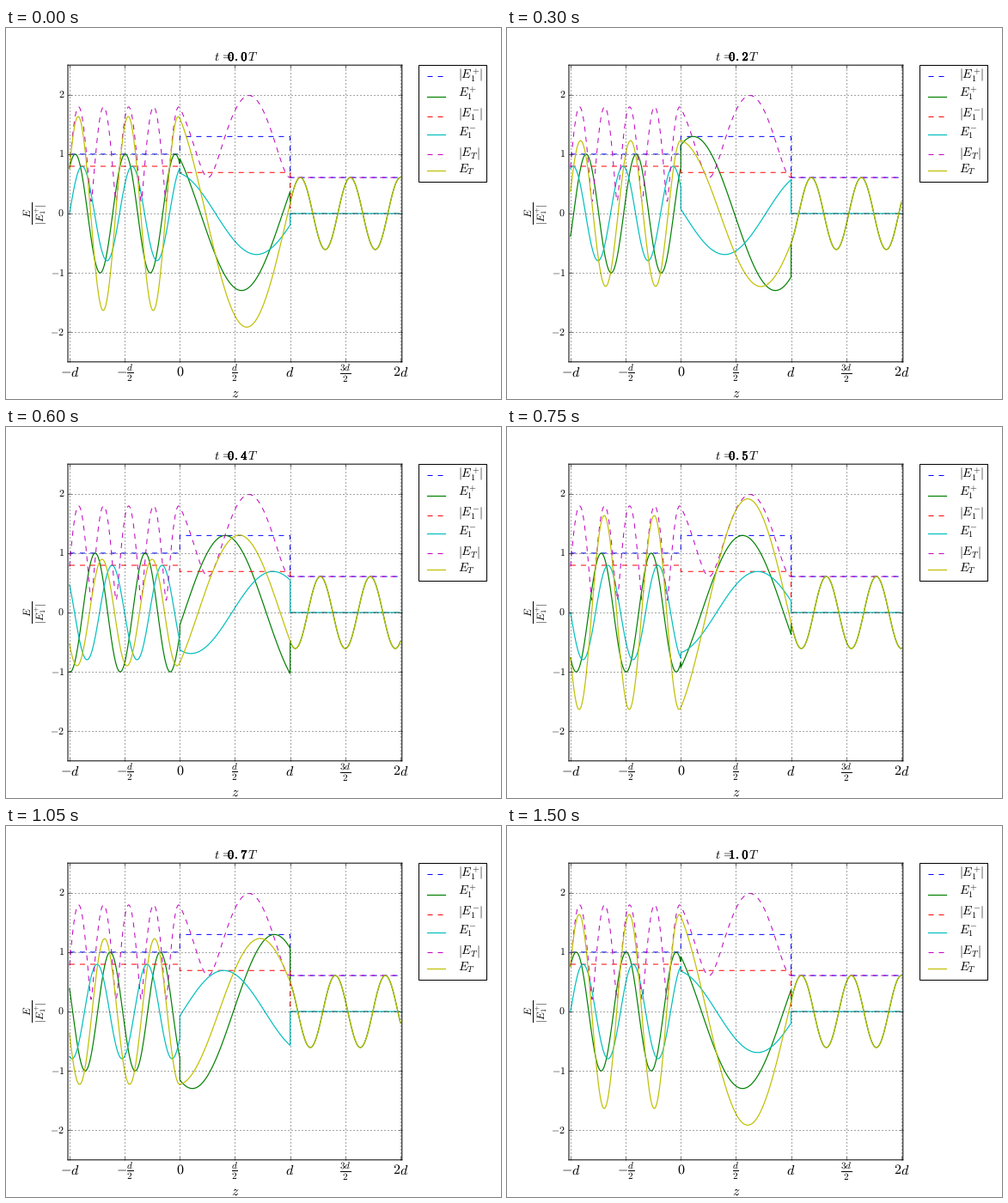
Recreate the animation shown at these times as a matplotlib script. Size 576 px wide and 432 px high, loop 1650 ms.

```python
import numpy as np
import matplotlib.pyplot as plt
from matplotlib.animation import FuncAnimation
from matplotlib.patches import Rectangle
from matplotlib.patheffects import withStroke

W, H, DPI = 576, 432, 72
FRAMES, INTERVAL = 11, 150
plt.rcParams.update({
    "mathtext.fontset": "cm",
    "text.hinting": "none",
    "lines.scale_dashes": False,
    "lines.solid_capstyle": "projecting",
    "lines.dash_capstyle": "butt",
    "axes.linewidth": 1.0,
    "path.simplify": False,
})

# Slab of thickness d = 1 between two identical, optically denser half-spaces.
RATIO = 3.28            # wave impedance of the slab relative to the outside
K1 = 13.85              # wave number outside
K2 = K1 / RATIO         # wave number inside
EXIT_PHASE = -1.284     # phase of the transmitted wave at z = d


def fields():
    """Positions and complex amplitudes of the forward and backward waves."""
    before, inside, after = (np.linspace(a, a + 1, 400) for a in (-1, 0, 1))
    c, s = np.cos(K2), np.sin(K2)
    incident = c - 0.5j * (RATIO + 1 / RATIO) * s
    reflected = -0.5j * (RATIO - 1 / RATIO) * s
    forward = np.concatenate([
        incident * np.exp(1j * K1 * before),
        (1 + RATIO) / 2 * np.exp(1j * K2 * (inside - 1)),
        np.exp(1j * K1 * (after - 1)),
    ])
    backward = np.concatenate([
        reflected * np.exp(-1j * K1 * before),
        (1 - RATIO) / 2 * np.exp(-1j * K2 * (inside - 1)),
        np.zeros_like(after),
    ])
    scale = np.exp(1j * EXIT_PHASE) / abs(incident)
    z = np.concatenate([before, inside, after])
    return z, forward * scale, backward * scale


fig = plt.figure(figsize=(W / DPI, H / DPI), dpi=DPI, facecolor="white")
ax = fig.add_axes([0.125, 0.1, 0.675, 0.8])
ax.set(xlim=(-1.015, 2.015), ylim=(-2.5, 2.5),
       xticks=np.arange(-1, 2.1, 0.5), yticks=range(-2, 3))
ax.tick_params(direction="in", top=True, right=True, length=4, width=0.5,
               labelbottom=False, labelleft=False)
ax.set_axisbelow(False)
ax.grid(color="black", linewidth=0.7, linestyle=(0, (1, 3)))
for spine in ax.spines.values():
    spine.set_snap(False)


def label(x, y, tex, size, ha="center", va="baseline", **kw):
    """Text at a pixel position counted from the top left corner."""
    return fig.text(x / W, 1 - y / H, f"${tex}$", fontsize=size,
                    ha=ha, va=va, **kw)


def pixel_line(xs, y, **style):
    fig.add_artist(plt.Line2D([x / W for x in xs], [1 - y / H] * 2, **style))


x_names = ["-d", r"-\frac{d}{2}", "0", r"\frac{d}{2}", "d",
           r"\frac{3d}{2}", "2d"]
for i, name in enumerate(x_names):
    label(73.9 + 64.16 * i, 405.5, name, 16)
for v in range(-2, 3):
    label(68, 216 - 69.12 * v, str(v), 12, ha="right", va="center")
label(266.6, 429.5, "z", 16)
label(33.5, 216, r"\frac{E}{|E_1^{+}|}", 17.28, va="center", rotation=90)

label(242, 38, r"t\/=", 14.4, ha="left")
clock = label(270, 38, "0", 14.4,
              path_effects=[withStroke(linewidth=0.6, foreground="black")])
label(293, 38, "T", 14.4, ha="right")

z, forward, backward = fields()
total = forward + backward
solid = dict(linewidth=1.2)
dashed = dict(linewidth=1.0, linestyle=(0, (6, 6)))

# label, wave, colours, then text baseline and sample height in the legend
series = [
    ("E_1^{+}", forward, "b", "g", (59, 56), (80, 80)),
    ("E_1^{-}", backward, "r", "c", (104, 102.5), (125.5, 124)),
    ("E_T", total, "m", "y", (150, 147), (169, 165.5)),
]
fig.add_artist(Rectangle((480.24 / W, 1 - 179 / H), 78.8 / W, 135.8 / H,
                         facecolor="white", edgecolor="black", linewidth=1))
waves = []
for name, wave, env_color, color, env_row, row in series:
    ax.plot(z, abs(wave), color=env_color, **dashed)
    line, = ax.plot(z, wave.real, color=color, **solid)
    waves.append((line, wave))
    for tex, shade, style, (base, mid) in (
            (f"|{name}|", env_color, dashed, env_row),
            (name, color, solid, row)):
        pixel_line((490.3, 510.5), mid, color=shade, **style)
        label(526, base, tex, 14.4, ha="left")


def update(i):
    t = i / 10
    for line, wave in waves:
        line.set_ydata((wave * np.exp(-2j * np.pi * t)).real)
    gap = r"\hspace{0.06}"
    clock.set_text(f"${i // 10}{gap}.{gap}{i % 10}$")
    return [clock] + [line for line, _ in waves]


anim = FuncAnimation(fig, update, frames=FRAMES, interval=INTERVAL,
                     repeat=True, repeat_delay=0, blit=False)
plt.show()
```
